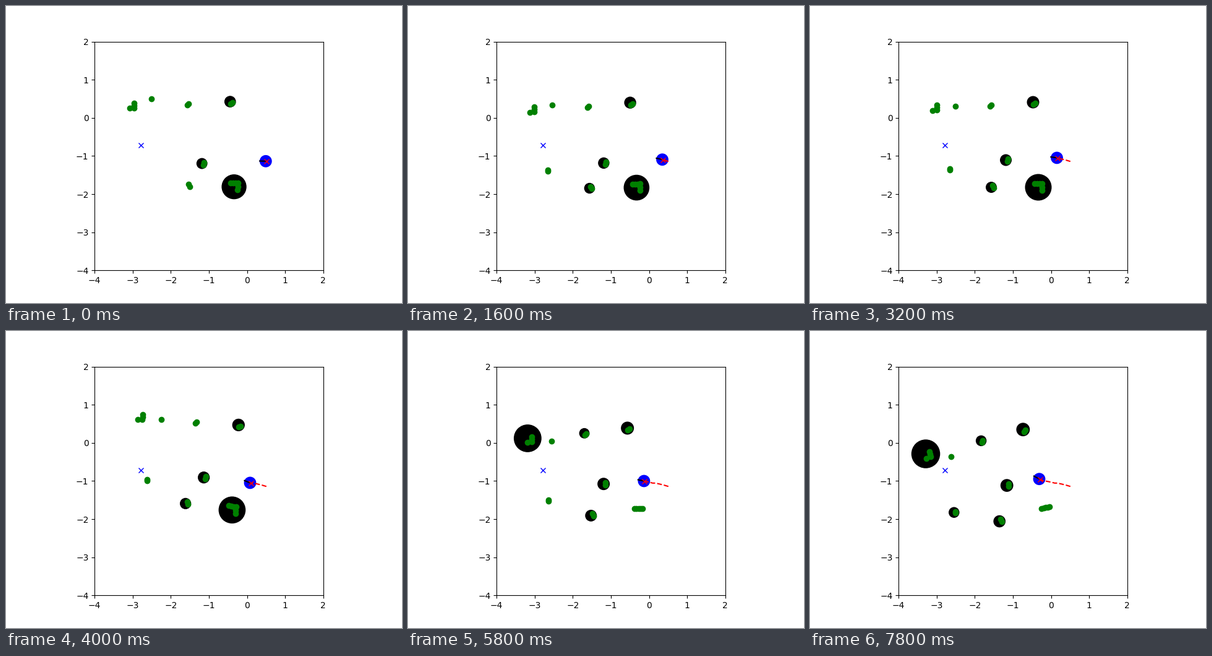
A matplotlib script that plays this animation: 640 px wide and 480 px high, repeating every 8000 ms.

```python
import numpy as np
import matplotlib.pyplot as plt
from matplotlib.animation import FuncAnimation
from matplotlib.patches import Circle

FRAMES, STEP = 40, 200
REF = 16       # frame at which landmark positions below are stated
SCALE = 61.6   # stage pixels per axis unit
ALWAYS, NEVER = (0, FRAMES), (0, 0)

# Robot key poses: frame, x, y, heading, turn of the sensed scene
POSES = np.array([
    (0, 419.8, 250.8, .03, .016), (8, 411, 248.2, .23, -.013),
    (16, 399, 245.4, .15, 0), (20, 394.5, 245.4, .38, .137),
    (25, 387.8, 243.7, .11, .067), (33, 375, 241.2, .3, -.027),
    (39, 370.5, 239.2, .5, -.205)])
KEYS = POSES[:, 0].astype(int)

# Sensor noise on the heading between the key poses
noise = np.random.RandomState(4).normal(0, .06, FRAMES).clip(-.14, .14)
noise[KEYS] = 0


def to_axes(pts):
    """Stage pixels (y down) to axis units."""
    x, y = np.reshape(pts, (-1, 2)).T
    return np.column_stack([(x - 143.2) / SCALE - 4, (427.2 - y) / SCALE - 4])


def turn(pts, pivot, angle):
    c, s = np.cos(angle), np.sin(angle)
    return (pts - pivot) @ np.array([[c, s], [-s, c]]) + pivot


def pose(n):
    return [np.interp(n, KEYS, col) for col in POSES.T[1:]]


class Landmark:
    """A fitted disc and its hit points, each shown over a span of frames."""

    def __init__(self, centre, radius, hits, disc=ALWAYS, seen=ALWAYS,
                 drift=(0, 0)):
        self.pts = np.array([centre, *hits], float)
        self.radius, self.drift = radius, np.array(drift)
        self.disc_span, self.hit_span = disc, seen
        self.disc = ax.add_patch(Circle((0, 0), .1, fc="black", lw=0))
        self.hits, = ax.plot([], [], "go")

    def update(self, n, pivot, angle):
        pts = to_axes(turn(self.pts + self.drift * (n - REF), pivot, angle))
        self.disc.center = pts[0]
        self.disc.radius = self.radius * (1 + .004 * (n - REF)) / SCALE
        self.hits.set_data(*pts[1:].T)
        for art, (start, end) in ((self.disc, self.disc_span),
                                  (self.hits, self.hit_span)):
            art.set_visible(start <= n < end)


fig, ax = plt.subplots(figsize=(6.4, 4.8), dpi=100)
ax.set_aspect("equal")
ax.set_xlim(-4, 2)
ax.set_ylim(-4, 2)

corner = [(x, 287) for x in (363, 367, 371, 375)] + [(375, 293), (375, 298)]
ledge = [(x, 286.3) for x in np.linspace(364, 377, 5)]

landmarks = [
    Landmark((360.5, 155.5), 10, [(361, 159), (364, 157)]),
    Landmark((316.5, 249), 9.5, [(320, 247), (319, 251)], drift=(0, -.45)),
    Landmark((369, 293), 21.5, corner, disc=(0, 27), seen=(0, 27)),
    Landmark((369, 293), 21.5, ledge, disc=NEVER, seen=(27, FRAMES)),
    Landmark((293, 293), 9, [(295, 290), (297, 294)], disc=(4, FRAMES)),
    Landmark((224, 264), 8, [(226, 263), (226, 265)], disc=(37, FRAMES),
             seen=(3, FRAMES)),
    Landmark((198.5, 162), 21.3, [(198, 169), (205, 168), (205, 164), (205, 160)],
             disc=(27, FRAMES)),
    Landmark((235, 162), 9, [(235, 162)], disc=NEVER, drift=(.1, .55)),
    Landmark((290.5, 159.5), 8, [(293, 160), (291, 162)], disc=(29, FRAMES)),
]

body = ax.add_patch(Circle((0, 0), 9.9 / SCALE, fc="blue", lw=0))
heading, = ax.plot([], [], "k-")
ax.plot(-2.78, -.72, "bx")
trail, = ax.plot([], [], "r--")
cross, = ax.plot([], [], "rx")

# The position estimate lags slightly behind the robot.
path = to_axes([np.add(pose(n)[:2], (1, .4)) for n in range(FRAMES)])


def update(n):
    x, y, aim, angle = pose(n)
    pivot = (x, np.interp(n, [20, 39], [265, 236]))
    for mark in landmarks:
        mark.update(n, pivot, angle + noise[n])
    tip = (x - 9.8 * np.cos(aim), y - 9.8 * np.sin(aim))
    body.center = to_axes((x, y))[0]
    heading.set_data(*to_axes([(x, y), tip]).T)
    trail.set_data(*path[:n + 1].T)
    cross.set_data(*path[n:n + 1].T)
    return []


anim = FuncAnimation(fig, update, frames=FRAMES, interval=STEP,
                     init_func=lambda: update(0), repeat=True, repeat_delay=0)
plt.show()
```
